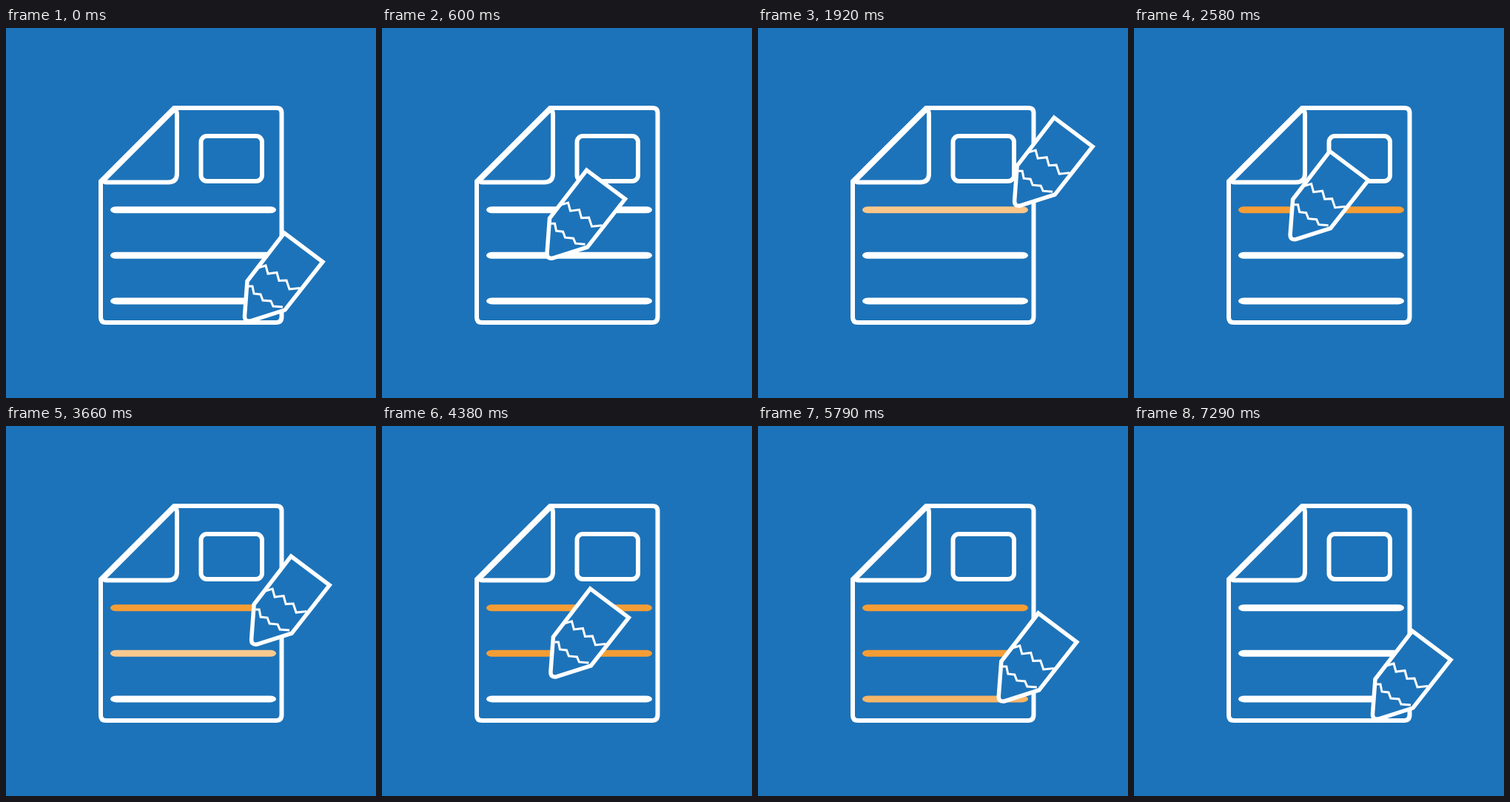
Write an HTML page that moves like this. It is 500x500 px and loops after 8940 ms.

```html
<!DOCTYPE html>
<html lang="en">
<head>
<meta charset="utf-8">
<title>Writing pencil</title>
<style>
html, body { margin: 0; height: 100%; overflow: hidden; background: #1d73b9; }
svg { display: block; width: 100%; height: 100%; fill: none; stroke: #fff; stroke-width: 6; }
.rule { stroke: none; fill: #fff; }
</style>
</head>
<body>
<svg viewBox="0 0 500 500">
  <path d="M128 207L227 108H366Q372.5 108 372.5 115V390Q372.5 398 365 398H135Q128 398 128 391Z"/>
  <path d="M133 205L226 112Q231 108 231 118V197Q231 208.5 219 208.5H137Q130 208.5 133 205Z"/>
  <rect x="263.5" y="146" width="82.5" height="61" rx="8"/>
  <rect class="rule" x="141" y="241.2" width="224" height="9" rx="8" ry="4.5"/>
  <rect class="rule" x="141" y="302.8" width="224" height="9" rx="8" ry="4.5"/>
  <rect class="rule" x="141" y="364.4" width="224" height="9" rx="8" ry="4.5"/>
  <g id="pencil">
    <path fill="#1d73b9" stroke-width="5.5" d="M376 277L428 316L377 381L330 396Q322 397 322.5 389L326 342Z"/>
    <g stroke-width="3">
      <path d="M341 324L351 321L354 332L366 330.5L369 341.5L379 341L383 353L397 351.5"/>
      <path d="M328 349L333 349L335 359L344 360L347 368L358 369L361 376L374 377"/>
    </g>
  </g>
</svg>
<script>
const LOOP = 8940;
// time, x offset, y offset
const stops = [
  [0, 0, 0],
  [1110, -177, -151], [2020, 31, -156],
  [2920, -178, -89], [3820, 26, -102],
  [4820, -178, -26], [5640, 3, -26],
  [6540, 0, 0]
];
const fadeStarts = [1220, 2990, 4880], FADE = 1210;
const white = [255, 255, 255], orange = [245, 157, 53];
const pencil = document.getElementById('pencil');
const rules = document.querySelectorAll('.rule');

const ramp = (t, a, b) => Math.min(1, Math.max(0, (t - a) / (b - a)));
const ease = u => u * u * (3 - 2 * u);
const mix = (a, b, u) => a + (b - a) * u;

function draw(t) {
  let i = 0;
  while (i < stops.length - 2 && t >= stops[i + 1][0]) i++;
  const [t0, x0, y0] = stops[i], [t1, x1, y1] = stops[i + 1];
  const u = ease(ramp(t, t0, t1));
  pencil.setAttribute('transform', `translate(${mix(x0, x1, u)} ${mix(y0, y1, u)})`);

  const keep = 1 - ramp(t, 6150, 7200);
  rules.forEach((rule, n) => {
    const tint = ramp(t, fadeStarts[n], fadeStarts[n] + FADE) * keep;
    rule.style.fill = `rgb(${white.map((w, c) => Math.round(mix(w, orange[c], tint)))})`;
  });
}

const start = performance.now();
function tick() {
  draw((performance.now() - start) % LOOP);
  requestAnimationFrame(tick);
}
tick();
</script>
</body>
</html>
```
